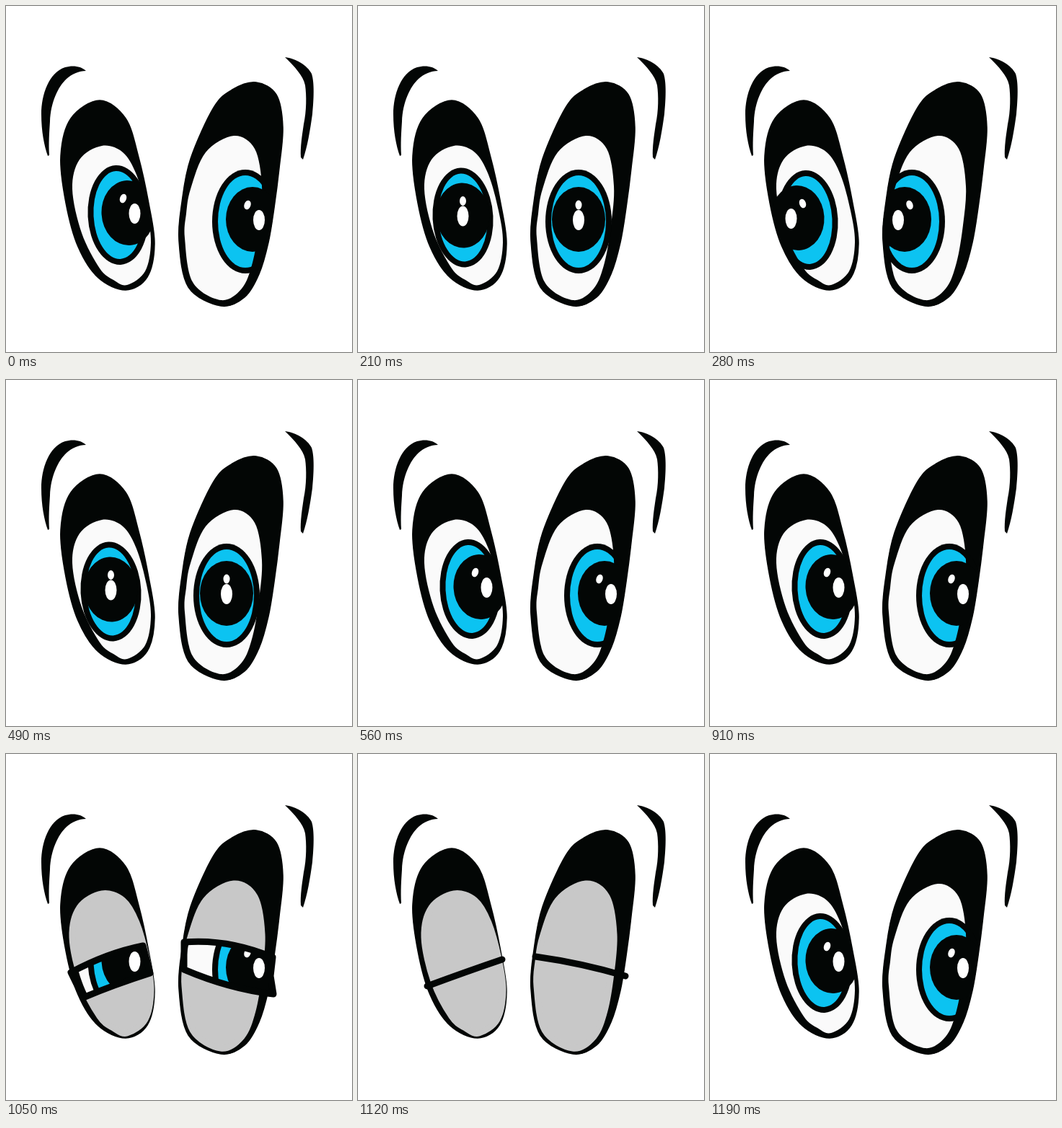
Animation of 480x480 px, one loop 1610 ms. Source, as an HTML page:

```html
<!DOCTYPE html>
<html lang="en">
<head>
<meta charset="utf-8">
<title>Glancing eyes</title>
<style>
  html, body { margin: 0; width: 100%; height: 100%; overflow: hidden; background: #fff; }
  svg { display: block; width: 100%; height: 100%; }
  .ink { fill: #030605; }
  .white { fill: #fafafa; }
  .shine { fill: #fff; }
  .blue { fill: #0cc3f1; }
  .lid { fill: #c8c8c8; stroke: #c8c8c8; stroke-width: 9; }
  .line { fill: none; stroke: #030605; stroke-width: 9; stroke-linecap: round; stroke-linejoin: round; }
  .socket { stroke: #030605; stroke-width: 1.5; }
</style>
</head>
<body>
<svg viewBox="0 0 480 480">
  <defs>
    <path id="socketL"/><path id="socketR"/>
    <path id="ballL"/><path id="ballR"/>
    <path id="slot" d="M90 303Q140 276 190 266L200 304Q150 320 107 338ZM247 261Q308 256 370 282L367 308L371 333Q310 326 247 299Z"/>
    <clipPath id="inSocketL"><use href="#socketL"/></clipPath>
    <clipPath id="inSocketR"><use href="#socketR"/></clipPath>
    <clipPath id="inBallL"><use href="#ballL"/></clipPath>
    <clipPath id="inBallR"><use href="#ballR"/></clipPath>
    <clipPath id="inSlot"><use href="#slot"/></clipPath>
  </defs>

  <g class="ink">
    <path d="M111 90C104 83 92 82 82 85C60 92 49 122 49 150C49 174 53 194 58 208L60 207C59 190 60 176 61 160C62 134 72 112 84 101C92 94 101 90 111 90Z"/>
    <path d="M387 71C402 73 418 82 424 94C428 106 427 130 425 150C422 172 418 196 412 213L409 210C408 196 411 178 413 164C417 146 417 124 415 110C412 96 400 84 387 71Z"/>
    <use class="socket" href="#socketL"/>
    <use class="socket" href="#socketR"/>
  </g>

  <g id="lids" class="lid"><use href="#ballL"/><use href="#ballR"/></g>
  <use id="gap" class="ink" href="#slot"/>
  <g id="eyes">
    <use class="white" href="#ballL"/>
    <use class="white" href="#ballR"/>
    <g id="irises"></g>
  </g>
  <use id="rim" class="line" href="#slot"/>
  <path id="shut" class="line" d="M96 322Q150 302 200 285M246 281Q310 290 371 308"/>
</svg>
<script>
  const STEP = 70, STEPS = 23;
  const byId = id => document.getElementById(id);
  const clamp = (v, low, high) => Math.min(high, Math.max(low, v));

  // Smooth closed curve through a few key points.
  function blob(text) {
    const points = text.split(",").map(pair => pair.trim().split(" ").map(Number));
    const at = i => points[(i + points.length) % points.length];
    const handle = (i, sign) => at(i).map((v, k) => v + sign * (at(i + 1)[k] - at(i - 1)[k]) / 6);
    const curves = points.map((_, i) => `C${handle(i, 1)} ${handle(i + 1, -1)} ${at(i + 1)}`);
    return `M${at(0)}${curves.join("")}Z`;
  }

  const outlines = {
    socketL: "130 131,90 156,76 208,83 273,100 334,128 377,166 394,196 376,206 330,198 274,184 210,166 156",
    socketR: "347 106,314 116,288 141,256 212,244 272,240 326,253 390,298 416,331 404,351 372,364 328,372 280,379 225,384 168,375 123",
    ballL: "133 194,102 213,92 254,105 315,130 364,149 380,168 387,193 368,201 328,195 284,181 234,162 203",
    ballR: "316 180,277 203,256 254,250 288,248 322,259 383,298 408,327 392,342 356,351 304,355 250,345 198"
  };
  for (const [id, points] of Object.entries(outlines)) byId(id).setAttribute("d", blob(points));

  // The iris slides by (slide, rise) from the middle, the pupil by reach.
  const eyes = [
    { side: "L", x: 145.5, y: 293.5, slide: 10, rise: 3.5, reach: 24, rx: 42, ry: 69, tilt: -3 },
    { side: "R", x: 306, y: 299, slide: 26, rise: 0, reach: 36, rx: 46, ry: 72, tilt: 0 }
  ];

  function ellipse(color, clip, x, y, rx, ry, tilt = 0) {
    return `<g clip-path="url(#${clip})"><ellipse class="${color}" cx="${x}" cy="${y}"
      rx="${rx}" ry="${ry}" transform="rotate(${tilt} ${x} ${y})"/></g>`;
  }

  // gaze: 1 looks right, -1 looks left
  function iris({ side, x, y, slide, rise, reach, rx, ry, tilt }, gaze) {
    const ball = `inBall${side}`, socket = `inSocket${side}`;
    const ringX = x + slide * gaze, ringY = y - rise * gaze;
    const pupilX = x + reach * gaze, pupilY = ringY - 3;
    return ellipse("ink", socket, ringX, ringY, rx, ry, tilt)
      + ellipse("blue", ball, ringX, ringY, rx - 8, ry - 8, tilt)
      + ellipse("ink", socket, pupilX, pupilY, 37, 45, tilt)
      + ellipse("shine", socket, pupilX - 7 * gaze, pupilY - 20, 4.5, 6.5, 20 * gaze)
      + ellipse("shine", socket, pupilX + 9 * gaze, pupilY + 1, 8, 14);
  }

  function show(id, visible) {
    byId(id).style.display = visible ? "" : "none";
  }

  function draw(step) {
    // A glance to the left centred on step 5, then two blinks four steps apart.
    const gaze = clamp(Math.abs(step - 5) - 2, -1, 1);
    const blink = step >= 11 && step < 19 ? (step - 11) % 4 : -1;
    const half = blink === 0, shut = blink === 1;

    byId("irises").innerHTML = eyes.map(eye => iris(eye, gaze)).join("");
    byId("eyes").setAttribute("clip-path", half ? "url(#inSlot)" : "none");
    show("lids", half || shut);
    show("gap", half);
    show("eyes", !shut);
    show("rim", half);
    show("shut", shut);
  }

  const begin = performance.now();
  let current;
  function tick() {
    const step = Math.floor((performance.now() - begin) / STEP) % STEPS;
    if (step !== current) draw(current = step);
    requestAnimationFrame(tick);
  }
  tick();
</script>
</body>
</html>
```
